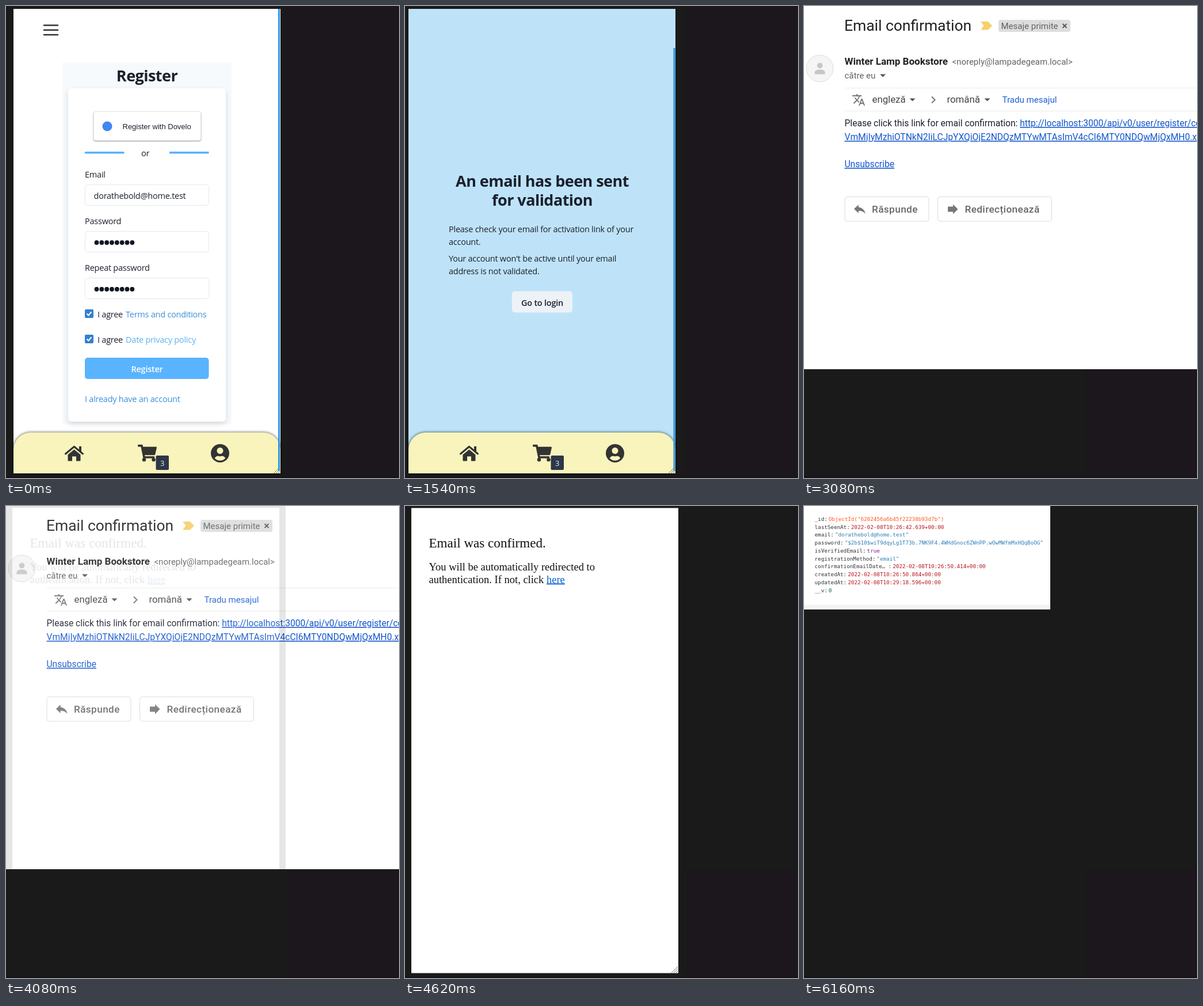
An HTML page for the animation above (8.16 s loop, 683 by 820 pixels).

```html
<!DOCTYPE html>
<html lang="en">
<head>
<meta charset="utf-8">
<title>Registration flow</title>
<style>
  html, body { margin: 0; width: 100%; height: 100%; overflow: hidden; background: #1a1a1b; }
  svg { position: absolute; left: 0; top: 0; visibility: hidden; }
  text { font: 14.5px 'Open Sans', 'Noto Sans', sans-serif; letter-spacing: -.017em; fill: #1a202c; }
  .mid { text-anchor: middle; }
  .head { font-size: 27px; font-weight: 700; letter-spacing: -.02em; }
  .btn { font-weight: 600; }
  .link { fill: #3a8edb; }
  .field { fill: #fff; stroke: #e2e8f0; }
  .arial, .arial text { font: 15.6px 'Liberation Sans', Arial, sans-serif; letter-spacing: 0; }
  .arial a, .arial .u { fill: #1155cc; text-decoration: underline; }
  .mail text { font-family: Roboto, sans-serif; letter-spacing: 0; }
  .mail .grey { font-size: 15px; fill: #5f6368; }
  .mail .lang { font-size: 16.8px; fill: #444; }
  .mail .act { font-size: 17.2px; font-weight: 500; letter-spacing: .4px; fill: #666; }
  .serif text { font: 18.5px 'Liberation Serif', 'Times New Roman', serif; letter-spacing: 0; fill: #111; }
  .serif .u { fill: #0b65d0; text-decoration: underline; }
  #rows text { font: 9.26px 'DejaVu Sans Mono', 'Noto Sans Mono', monospace; letter-spacing: 0; fill: #333; }
</style>
</head>
<body>

<!-- Register form -->
<svg width="683" height="820">
  <defs>
    <g id="dark">
      <rect width="683" height="820" fill="#1b171d"/>
      <rect width="488" height="820" fill="#1a1a1b"/>
      <rect y="818" width="683" height="2" fill="#141216"/>
    </g>
    <g id="grip" fill="none" stroke="#777">
      <path d="M0 11L11 0M4 11L11 4M8 11L11 8"/>
    </g>
    <g id="nav">
      <path d="M13 812V771a30 30 0 0 1 30-30H447a30 30 0 0 1 30 30V812Z" fill="#f8f4bc" style="filter:drop-shadow(0 0 2.5px #000b)"/>
      <g fill="#333">
        <path d="M103.5 778L118.5 765.5L133.5 778" fill="none" stroke="#333" stroke-width="3" stroke-linejoin="round" stroke-linecap="round"/>
        <path d="M127 765h4v9h-4zM107.5 779.5L118.5 770.5L129.5 779.5V789.5q0 1-1 1H122V782.5H115V790.5H108.5q-1 0-1-1Z"/>
        <g transform="translate(229 762) scale(.0573)">
          <path d="M0 24Q0 0 24 0H127Q146 0 150 19L159 64H552Q580 66 575 93L528 301Q523 320 505 320H212L218 352H487Q512 355 510 381L504 416H166L94 64H24Q0 64 0 40Z"/>
          <circle cx="192" cy="456" r="56"/>
          <circle cx="480" cy="456" r="56"/>
        </g>
        <g transform="translate(356 761) scale(.0645)">
          <circle cx="248" cy="248" r="248"/>
          <g fill="#f8f4bc">
            <circle cx="248" cy="180" r="86"/>
            <path d="M102 380Q138 320 200 320Q248 336 296 320Q358 320 394 380A192 192 0 0 1 102 380Z"/>
          </g>
        </g>
      </g>
      <rect x="260.500" y="781" width="22.500" height="25" rx="2" fill="#2d3748"/>
      <text x="271.500" y="798.500" class="mid" style="font-size:13px;fill:#e8edf3">3</text>
      <use href="#grip" x="465" y="801"/>
    </g>
    <g id="check">
      <rect width="15" height="15" rx="2" fill="#3182ce"/>
      <path d="M3.500 7.500L6.300 10.500L11.500 4.300" fill="none" stroke="#fff" stroke-width="2"/>
    </g>
    <path id="dots" d="M0 0h62" stroke="#111722" stroke-width="7.800" stroke-linecap="round" stroke-dasharray="0 8.830"/>
    <path id="caret" d="M-5 -2.500h10l-5 5z" fill="#555"/>
  </defs>
  <use href="#dark"/>
  <rect x="13" y="5" width="464" height="807" fill="#fff"/>
  <path d="M66 33.500h24M66 41.700h24M66 50h24" stroke="#333" stroke-width="2.600" stroke-linecap="round"/>
  <rect x="98" y="98" width="294" height="629" fill="#f7fafc"/>
  <text x="245" y="131" class="mid head">Register</text>
  <rect x="108" y="143" width="274" height="579" rx="6" fill="#fff" style="filter:drop-shadow(0 4px 5px #0002)"/>
  <rect x="152.500" y="183.500" width="186" height="50" rx="3" fill="#fff" stroke="#e4e4e4" style="filter:drop-shadow(0 1px 1px #0006)"/>
  <circle cx="176" cy="209" r="8.500" fill="#4285f4"/>
  <text x="202.500" y="213.500" class="arial" style="font-size:13px">Register with Dovelo</text>
  <path d="M137 254.700h68.500M284 254.700h68.500" stroke="#5ab1ff" stroke-width="3.600"/>
  <text x="242" y="261" class="mid">or</text>
  <text x="137" y="298">Email</text>
  <text x="137" y="379">Password</text>
  <text x="137" y="460">Repeat password</text>
  <rect x="137.500" y="310.500" width="215" height="36" rx="5" class="field"/>
  <rect x="137.500" y="391.500" width="215" height="36" rx="5" class="field"/>
  <rect x="137.500" y="472.500" width="215" height="36" rx="5" class="field"/>
  <text x="152.500" y="335">dorathebold@home.test</text>
  <use href="#dots" x="157.500" y="411"/>
  <use href="#dots" x="157.500" y="492"/>
  <use href="#check" x="137" y="527"/>
  <use href="#check" x="137" y="571"/>
  <text x="159" y="541">I agree</text>
  <text x="208" y="541" class="link">Terms and conditions</text>
  <text x="159" y="585">I agree</text>
  <text x="208" y="585" style="fill:#5ab1f5">Date privacy policy</text>
  <rect x="137" y="611" width="215.500" height="37" rx="5" fill="#5ab3ff"/>
  <text x="245" y="636" class="mid btn" style="fill:#fff">Register</text>
  <text x="137" y="688" class="link">I already have an account</text>
  <use href="#nav"/>
  <rect x="473" y="5" width="3" height="803" fill="#2f94e4"/>
</svg>

<!-- Validation notice -->
<svg width="683" height="820">
  <use href="#dark"/>
  <rect x="6" y="5" width="464" height="807" fill="#bee3f8"/>
  <text x="238.500" y="313.500" class="mid head">An email has been sent</text>
  <text x="238.500" y="346.500" class="mid head">for validation</text>
  <text x="76" y="393">Please check your email for activation link of your</text>
  <text x="76" y="415">account.</text>
  <text x="76" y="444">Your account won't be active until your email</text>
  <text x="76" y="466">address is not validated.</text>
  <rect x="186" y="495.500" width="105" height="37" rx="5" fill="#edf2f7"/>
  <text x="238.500" y="520.500" class="mid btn">Go to login</text>
  <use href="#nav" x="-7"/>
  <rect x="466.500" y="73" width="3" height="735" fill="#2f94e4"/>
</svg>

<!-- Confirmation mail -->
<svg width="683" height="820" class="mail">
  <use href="#dark"/>
  <rect width="683" height="631" fill="#fff"/>
  <text x="70" y="43" style="font-size:26.400px;fill:#202124">Email confirmation</text>
  <path d="M307 27h13l7 7.200l-7 7.200h-13l5.500-7.200z" fill="#f7cf6b"/>
  <rect x="338" y="24" width="125" height="21" rx="4" fill="#ddd"/>
  <text x="342.500" y="39.500" class="grey">Mesaje primite</text>
  <path d="M449.500 31l7 7m0-7l-7 7" stroke="#555" stroke-width="1.800"/>
  <circle cx="27.500" cy="108.500" r="23.300" fill="#f5f5f5" stroke="#ddd"/>
  <g fill="#c6c6c6">
    <circle cx="27.500" cy="103.500" r="4.800"/>
    <path d="M18.500 118.500v-3q0-5 9-5t9 5v3z"/>
  </g>
  <text x="70.500" y="102" style="font-size:17px;font-weight:700;fill:#202124">Winter Lamp Bookstore</text>
  <text x="257.500" y="102" class="grey">&lt;noreply@lampadegeam.local&gt;</text>
  <text x="70.500" y="126" class="grey">către eu</text>
  <use href="#caret" x="137" y="121"/>
  <path d="M71 142.500H683M71 182.500H683" stroke="#ebebeb"/>
  <path transform="translate(83 151)" fill="#777" fill-rule="evenodd" d="M12.900 15.100l-2.600-2.500Q13 9.500 14.100 6H17V4H10V2H8V4H1V6H12.200Q11.200 9 9 11.400Q7.600 9.800 6.700 8H4.700Q5.800 10.500 7.700 12.600L2.600 17.600L4 19L9 14L12.100 17.100ZM18.500 10H16.500L12 22H14L15.100 19H19.900L21 22H23ZM15.900 17L17.500 12.700L19.100 17Z"/>
  <text x="118.500" y="168" class="lang">engleză</text>
  <use href="#caret" x="188.500" y="163"/>
  <path d="M222 157.500l5.500 5.500l-5.500 5.500" fill="none" stroke="#777" stroke-width="2"/>
  <text x="248.500" y="168" class="lang">română</text>
  <use href="#caret" x="318.500" y="163"/>
  <text x="344.500" y="168" style="font-size:15.100px;fill:#1a5fd0">Tradu mesajul</text>
  <g class="arial">
    <text x="70.500" y="209">Please click this link for email confirmation: <tspan class="u">http://localhost:3000/api/v0/user/register/confirm/</tspan></text>
    <text x="70.500" y="233" class="u">VmMjIyMzhiOTNkN2IiLCJpYXQiOjE2NDQzMTYwMTAsImV4cCI6MTY0NDQwMjQxMH0.x</text>
    <text x="70.500" y="280" class="u">Unsubscribe</text>
  </g>
  <g fill="none" stroke="#dadce0">
    <rect x="71" y="331.500" width="146" height="42.500" rx="4"/>
    <rect x="232.500" y="331.500" width="198" height="42.500" rx="4"/>
  </g>
  <g fill="#777">
    <path transform="translate(83.700 340) scale(1.100 1.050)" d="M10 9V5l-7 7 7 7v-4.100c5 0 8.500 1.600 11 5.100-1-5-4-10-11-11z"/>
    <path d="M250 348.500h9v-4l8.500 8.500l-8.500 8.500v-4h-9z"/>
  </g>
  <text x="118" y="359" class="act">Răspunde</text>
  <text x="279.500" y="359" class="act">Redirecționează</text>
</svg>

<!-- Confirmed page -->
<svg width="683" height="820" class="serif">
  <use href="#dark"/>
  <rect width="683" height="631" fill="#1a1a1a"/>
  <rect x="11" y="3.500" width="464" height="808" fill="#fff"/>
  <text x="41.500" y="72" style="font-size:23.100px">Email was confirmed.</text>
  <text x="41.500" y="112">You will be automatically redirected to</text>
  <text x="41.500" y="133.500">authentication. If not, click <tspan class="u">here</tspan></text>
  <use href="#grip" x="463" y="800"/>
</svg>

<!-- Database record -->
<svg width="683" height="820">
  <use href="#dark"/>
  <rect width="683" height="631" fill="#1a1a1a"/>
  <rect width="428" height="179.500" fill="#fff"/>
  <rect y="171.500" width="428" height="8" fill="#f1f3f4"/>
  <g id="rows"></g>
</svg>

<script>
  const date = '#b8141c', string = '#2f7db8';
  const record = [
    ['_id:', 'ObjectId("6202456a6b45f22238b93d7b")', '#ff5a1f'],
    ['lastSeenAt:', '2022-02-08T10:26:42.639+00:00', date],
    ['email:', '"dorathebold@home.test"', string],
    ['password:', '"$2b$10$wiT9dqyLg1T73b.7NK9F4.4WHdGnoc6ZWnPP.wOwMWfmMxHQqBoOG"', string],
    ['isVerifiedEmail:', 'true', '#86198f'],
    ['registrationMethod:', '"email"', string],
    ['confirmationEmailDate… :', '2022-02-08T10:26:50.414+00:00', date],
    ['createdAt:', '2022-02-08T10:26:50.864+00:00', date],
    ['updatedAt:', '2022-02-08T10:29:18.596+00:00', date],
    ['__v:', '0', '#145a4a'],
  ];
  document.getElementById('rows').innerHTML = record.map(([key, value, color], i) =>
    `<text x="18.500" y="${25.8 + 13.78 * i}">${key}<tspan dx="2" fill="${color}" style="fill:${color}">${value}</tspan></text>`
  ).join('');

  const LOOP = 8160, STEP = 60, STEPS = 10;
  // Start of each fade and the area shared by both pictures; the rest cuts at the end.
  const fades = [
    { at: 1000, w: 683, h: 820 },
    { at: 2540, w: 480, h: 631 },
    { at: 4080, w: 486, h: 631 },
    { at: 5620, w: 428, h: 179.5 },
  ];
  const scenes = [...document.querySelectorAll('svg')];

  function show(scene, alpha, clip) {
    scene.style.visibility = 'visible';
    scene.style.opacity = alpha;
    scene.style.clipPath = clip;
  }

  function draw(now) {
    const t = now % LOOP;
    const n = fades.filter(f => t >= f.at).length;
    const fade = fades[n - 1];
    const alpha = fade ? Math.min(1, (Math.floor((t - fade.at) / STEP) + 1) / STEPS) : 1;
    for (const s of scenes) s.style.visibility = 'hidden';
    if (alpha < 1) {
      show(scenes[n - 1], 1, 'none');
      show(scenes[n], alpha, `inset(0 ${683 - fade.w}px ${820 - fade.h}px 0)`);
    } else {
      show(scenes[n], 1, 'none');
    }
    requestAnimationFrame(draw);
  }
  draw(performance.now());
</script>
</body>
</html>
```
